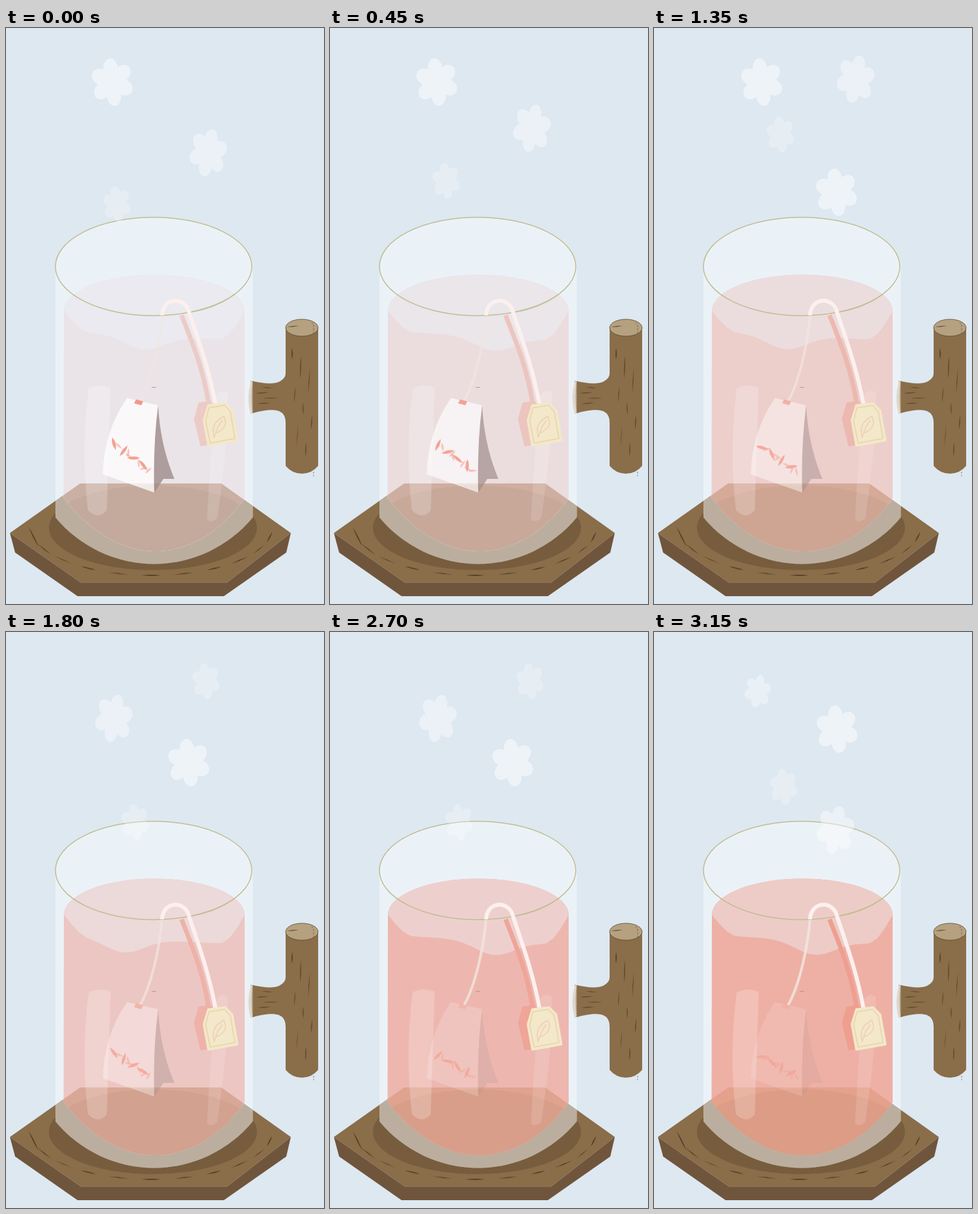
Write an HTML page that moves like this. It is 489 by 884 pixels and loops after 3.6 s.

```html
<!DOCTYPE html>
<html lang="en">
<head>
<meta charset="utf-8">
<title>Tea steeping</title>
<style>
  html, body { margin: 0; width: 100%; height: 100%; overflow: hidden; background: #dde8f1; }
  svg { display: block; width: 100%; height: 100%; }
</style>
</head>
<body>
<svg viewBox="0 0 489 884">
  <defs>
    <clipPath id="plateClip"><path id="plateTop" d="M6 775L114 699H331L438 775L340 851H115Z"/></clipPath>
    <clipPath id="liquidClip"><path id="liquid" d="M89 434L88.500 721C130 775 180 803 229 803S326 778 367 722V434A139 55.500 0 0 0 89 434"/></clipPath>
    <path id="glass" d="M76 366V751A197 197 0 0 0 379.500 751V366A151 75.500 0 0 0 76 366"/>
  </defs>

  <g id="plate">
    <path fill="#70553d" d="M6 775L115 851H340L438 775L431 805L335 872H110L14 805Z"/>
    <use href="#plateTop" fill="#8a6d49"/>
    <path d="M115 851H340" stroke="#a58c66" stroke-width=".6"/>
    <ellipse id="plateShadow" cx="226" cy="767" rx="160" ry="65" fill="#775c3e"/>
    <path id="plateGrain" fill="#554128"/>
  </g>

  <g id="handle">
    <path fill="#8a6d49" d="M376 541C395 546 412 547 420 543Q430 538 430 530V460H480V672Q470 684 455 684T430 672V606Q430 592 420 588C410 584 392 587 376 592Z"/>
    <path fill="#c9b9a6" d="M377 541Q369 567 376 592L379 591Q376 566 379 542Z"/>
    <ellipse cx="455" cy="460" rx="25" ry="13" fill="#b5a180" stroke="#5a472d" stroke-width=".8"/>
    <path id="handleGrain" fill="#554128"/>
    <path d="M470 452L473 456V471M473 681V688" fill="none" stroke="#554128" stroke-width=".6" stroke-dasharray="3 2"/>
  </g>

  <use href="#glass" fill="#fff" opacity=".41"/>
  <use href="#glass" fill="#bbae9e" clip-path="url(#plateClip)"/>
  <g id="tea"></g>

  <g id="highlights" fill="#fff">
    <path opacity=".2" d="M127 553Q143 545 161 552L155 740Q142 756 126 740Q115 650 127 553Z"/>
    <path opacity=".13" d="M324 562Q333 553 341 560Q344 620 325 752Q317 760 309 755Q316 620 324 562Z"/>
  </g>

  <g id="rim" fill="none" stroke="#c0bd92">
    <ellipse cx="227" cy="366" rx="151" ry="75.500" stroke-width="1.500"/>
    <path d="M280 437Q322 431 352 409"/>
  </g>

  <path d="M240 441C241 412 277 411 282 438C294 474 312 522 322 577" fill="none" stroke="#fcf0ee" stroke-width="6"/>
  <g id="tag" stroke-linejoin="round">
    <path fill="#f3e8c9" stroke="#f3e8c9" stroke-width="3" d="M311 579L337 576L348 587L356 633L311 641L304 602Z"/>
    <path fill="none" stroke="#e9d4ac" stroke-width="1.500" d="M312 583L336 579L345 589L352 630L314 637L307 603Z"/>
    <path fill="none" stroke="#edcfb5" stroke-width="1.500" d="M320 627Q314 606 335 596Q344 613 322 622M320 629Q325 611 333 602"/>
  </g>
  <g id="steam" fill="#fff"></g>
</svg>

<script>
const STEP = 450, STEPS = 8;
const byId = id => document.getElementById(id);
const repeat = (count, make) => Array.from({ length: count }, (_, i) => make(i)).join('');
const lerp = (a, b, p) => a + (b - a) * p;
const mix = (from, to, p) => `rgb(${from.map((c, i) => Math.round(lerp(c, to[i], p)))})`;

let seed = 7;
function random(min, max) {
  seed = seed * 16807 % 2147483647;
  return lerp(min, max, seed / 2147483647);
}

// A thin sliver, pointed at both ends, centred on x, y.
function sliver(x, y, length, angle, width) {
  const dx = Math.cos(angle) * length / 2, dy = Math.sin(angle) * length / 2;
  const nx = -Math.sin(angle) * width, ny = Math.cos(angle) * width;
  return `M${x - dx} ${y - dy}Q${x + nx} ${y + ny} ${x + dx} ${y + dy}Q${x - nx} ${y - ny} ${x - dx} ${y - dy}`;
}

function drawGrain() {
  const alongPlate = i => {
    const a = lerp(.2, 2.95, i / 10);
    const tangent = Math.atan2(73 * Math.cos(a), -185 * Math.sin(a));
    return sliver(224 + 185 * Math.cos(a), 767 + 73 * Math.sin(a), random(18, 34), tangent, random(1, 2.2));
  };
  const downHandle = i => sliver(440 + i * 13 % 35, 500 + i * 21, random(14, 42), random(1.5, 1.65), random(.6, 2));
  const alongBranch = i => sliver(random(393, 414), 552 + i * 8, random(16, 24), random(-.15, .15), 1.2);
  byId('plateGrain').setAttribute('d', repeat(11, alongPlate));
  byId('handleGrain').setAttribute('d',
    repeat(8, downHandle) + repeat(4, alongBranch) + sliver(441, 458, 18, -.1, 1.2));
}

// The surface edge sags gently to the right, with one swell that sways from step to step.
function surfacePath(step) {
  const swell = 220 + 38 * Math.cos((step - 1.4) * Math.PI * .4);
  const edge = repeat(23, i => {
    const u = (i + 1) / 24, x = lerp(367, 89, u);
    const sag = lerp(480, 465, u) + 22 * Math.exp(-(((x - swell) / 42) ** 2));
    const side = Math.min(1, 7 * u, 7 * (1 - u));
    return `L${x} ${lerp(434, sag, Math.sin(side * Math.PI / 2))}`;
  });
  return `M89 434A139 55.5 0 0 1 367 434${edge}Z`;
}

// Leaves scatter over the bag, turn each step and slowly settle.
function leaf(i, step, p) {
  const x = 166 + i * 23 % 54;
  const y = lerp(638, 652, p) + i * 19 % 46 * lerp(1, .75, p);
  const bold = i % 3 === 0;
  const d = sliver(x, y, bold ? 20 : 14, i * 2.4 + step * .7 + 1.3, bold ? 5 : 3.5);
  return `<path d="${d}" opacity="${bold ? .95 : .55}"/>`;
}

function tea(step) {
  const p = step / (STEPS - 1);
  const clarity = .13 + .62 * (1 - p) ** 1.3;
  const shade = mix([236, 203, 199], [239, 159, 144], p);
  return `
    <use href="#liquid" fill="${mix([234, 228, 232], [238, 176, 165], p)}"/>
    <g clip-path="url(#plateClip)"><g clip-path="url(#liquidClip)">
      <use href="#liquid" fill="${mix([202, 176, 163], [228, 161, 140], p)}"/>
      <use href="#plateShadow" opacity=".07"/>
    </g></g>
    <path d="${surfacePath(step)}" fill="${mix([234, 234, 240], [237, 204, 199], p)}"/>
    <path d="M206 573C222 545 236 490 240 440" fill="none" stroke="#f3e7e0" stroke-width="4" opacity="${lerp(.5, .85, p)}"/>
    <path d="M270 441C286 481 303 522 312 578" fill="none" stroke="${shade}" stroke-width="7"/>
    <path d="M296 575L314 572L322 580L312 640L299 642L289 600Z" fill="${shade}"/>
    <path d="M186 568L234 579Q226 640 228 713L149 685Q150 620 186 568Z" fill="#fff" opacity="${clarity}"/>
    <path d="M234 579Q237 640 259 692H242L228 713Q226 640 234 579Z" fill="#a08c8c" opacity="${clarity * 1.07}"/>
    <path d="M200 570L211 573L208 579L197 576Z" fill="#f0998a" opacity="${1 - p * .75}"/>
    <path d="M224 551.500H231" stroke="#a58f90" stroke-width=".8"/>
    <g fill="#f29c8c" opacity="${lerp(1, .6, p)}">${repeat(10, i => leaf(i, step, p))}</g>`;
}

const wide = { width: 65, height: 72, turn: -98, opacity: .5 };
const tall = { width: 58, height: 73, turn: -75, opacity: .42 };
const small = { width: 43, height: 55, turn: -100, opacity: .27 };
const little = { width: 41, height: 50, turn: -75, opacity: .36 };

// Each puff drifts in a straight line between its first and last step.
const puffs = [
  { kind: wide, first: 0, last: 3, from: [131, 47], to: [133, 47] },
  { kind: tall, first: 0, last: 3, from: [282, 155], to: [281, 42] },
  { kind: small, first: 0, last: 3, from: [149, 243], to: [173, 136] },
  { kind: tall, first: 2, last: 2, from: [238, 232] },
  { kind: wide, first: 3, last: 5, from: [248, 216], to: [249, 113] },
  { kind: small, first: 4, last: 5, from: [177, 264], to: [178, 210] },
  { kind: tall, first: 4, last: 4, from: [137, 96] },
  { kind: small, first: 4, last: 4, from: [286, 48] },
  { kind: little, first: 5, last: 5, from: [139, 66] },
  { kind: tall, first: 5, last: 5, from: [250, 267] }
];

function puff({ kind, first, last, from, to = from }, step) {
  const p = (step - first) / (last - first || 1);
  const x = lerp(from[0], to[0], p) + kind.width / 2, y = lerp(from[1], to[1], p) + kind.height / 2;
  const petals = repeat(6, i =>
    `<ellipse cx=".29" rx=".22" ry=".17" transform="rotate(${kind.turn + i * 60})"/>`);
  return `<g opacity="${kind.opacity}" transform="translate(${x} ${y}) scale(${kind.width} ${kind.height})">
    <circle r=".32"/>${petals}</g>`;
}

function steam(step) {
  const pose = step < 6 ? step : step - 2; // the steam repeats its last two poses
  return puffs.filter(({ first, last }) => first <= pose && pose <= last)
    .map(item => puff(item, pose)).join('');
}

drawGrain();
const start = performance.now();
let shown = -1;
function draw() {
  const step = Math.floor((performance.now() - start) / STEP) % STEPS;
  if (step !== shown) {
    shown = step;
    byId('tea').innerHTML = tea(step);
    byId('steam').innerHTML = steam(step);
  }
  requestAnimationFrame(draw);
}
draw();
</script>
</body>
</html>
```
